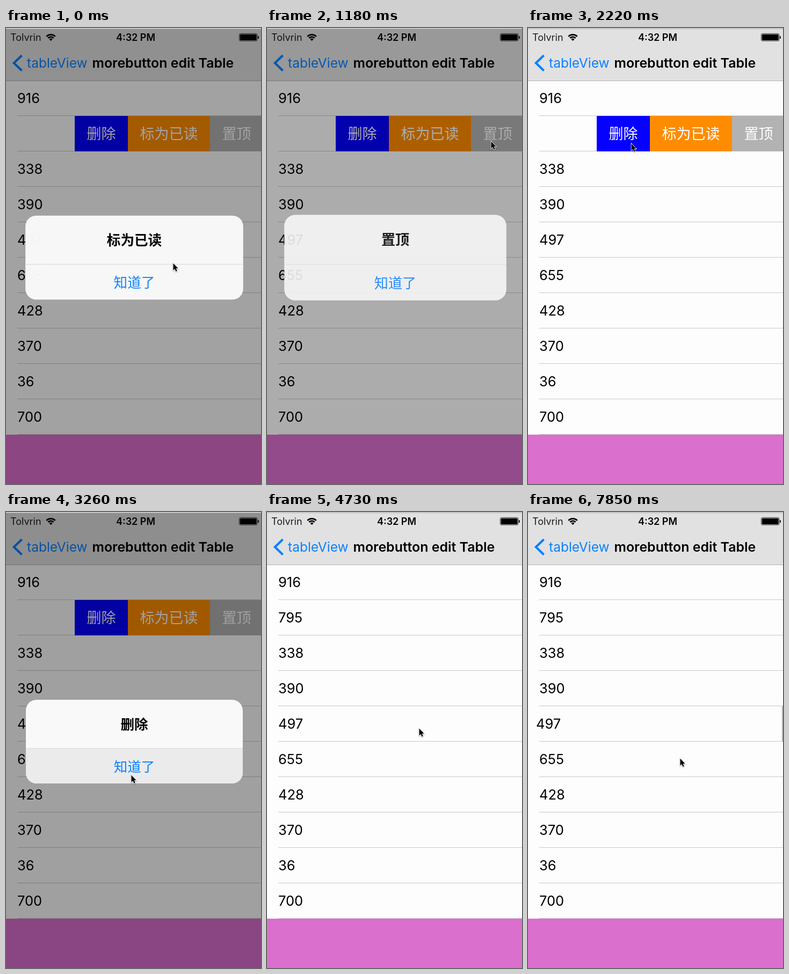
Animation, 475 px wide and 850 px high, one loop 7990 ms. Source, as an HTML page with a canvas:

```html
<!DOCTYPE html>
<html lang="zh">
<head>
<meta charset="utf-8">
<title>Table actions</title>
<style>
html, body { margin: 0; width: 100%; height: 100%; overflow: hidden; background: #fdfdfd; }
canvas { display: block; width: 475px; height: 850px; }
</style>
</head>
<body>
<canvas id="stage" width="475" height="850"></canvas>
<script>
const ctx = document.getElementById('stage').getContext('2d');
const W = 475, H = 850, LOOP = 7990, STEPS = 54;
const STEP = LOOP / STEPS;
const LATIN = 'Inter, Roboto, sans-serif';
const HAN = '"Noto Sans CJK SC", "Noto Sans CJK", sans-serif';
const BLUE = '#0b80ff';
const ROW_TOP = 98, ROW_H = 66, CELL_GAP = 4;
const LABEL = 27, PAD = 22.5;

const values = ['916', '795', '338', '390', '497', '655', '428', '370', '36', '700'];
const buttons = [
  { label: '删除', color: '#0500ff' },
  { label: '标为已读', color: '#ff8c00' },
  { label: '置顶', color: '#b2b2b2' }
];
const buttonWidth = b => b.label.length * LABEL + 2 * PAD;
const OPEN = buttons.reduce((sum, b) => sum + buttonWidth(b), 0);

const alerts = [
  { title: '标为已读', show: -274, hide: 400 },
  { title: '置顶', show: 1035, hide: 1750 },
  { title: '删除', show: 2300, hide: 3280 }
];

// Places where the pointer rests to tap
const rests = [
  { t: 0, x: 311, y: 438 },
  { t: 400, x: 258, y: 470 },
  { t: 1040, x: 417, y: 211 },
  { t: 1750, x: 256, y: 474 },
  { t: 2310, x: 192, y: 215 },
  { t: 3280, x: 233, y: 490 },
  { t: 3650, x: 213, y: 493 },
  { t: 4800, x: 283, y: 403 }
];
const ARRIVE = 100, LEAVE = 150;
const CLOSE = { start: 3700, length: 600 };
const DRAG = { start: 5474, stroke: 592 };

const mix = (a, b, p) => a + (b - a) * p;

function ease(p) {
  p = Math.min(1, Math.max(0, p));
  return p * p * (3 - 2 * p);
}

// 0 at the right end of the drag, 1 at the left end
function swing(t) {
  return (1 - Math.cos(Math.PI * (t - DRAG.start) / DRAG.stroke)) / 2;
}

function pointerAt(t) {
  if (t >= DRAG.start) {
    const turn = DRAG.start + DRAG.stroke;
    return [mix(283, 11, swing(t)), mix(403, 459, ease((t - turn) / (3 * DRAG.stroke)))];
  }
  const i = rests.findIndex(r => t < r.t - ARRIVE);
  if (i < 0) return [rests.at(-1).x, rests.at(-1).y];
  const a = rests[Math.max(0, i - 1)], b = rests[i];
  const p = ease((t - a.t - LEAVE) / (b.t - ARRIVE - a.t - LEAVE));
  return [mix(a.x, b.x, p), mix(a.y, b.y, p)];
}

function rowShift(i, t) {
  if (i === 1) return OPEN * (1 - ease((t - CLOSE.start) / CLOSE.length));
  if (i === 4 && t > DRAG.start) return mix(6, 249, swing(t));
  return 0;
}

function rect(x, y, w, h, color) {
  ctx.fillStyle = color;
  ctx.fillRect(x, y, w, h);
}

function text(str, x, y, size, color, weight = 400, family = LATIN, align = 'left') {
  ctx.font = `${weight} ${size}px ${family}`;
  ctx.textAlign = align;
  ctx.fillStyle = color;
  ctx.fillText(str, x, y);
}

function drawWifi(x, y) {
  const from = -Math.PI * 0.75, to = -Math.PI * 0.25;
  ctx.fillStyle = ctx.strokeStyle = '#000';
  ctx.lineWidth = 2.6;
  for (const r of [7.4, 11.6]) {
    ctx.beginPath();
    ctx.arc(x, y, r, from, to);
    ctx.stroke();
  }
  ctx.beginPath();
  ctx.moveTo(x, y);
  ctx.arc(x, y, 4.4, from, to);
  ctx.fill();
}

function drawBattery() {
  ctx.strokeStyle = ctx.fillStyle = '#000';
  ctx.lineWidth = 0.75;
  ctx.beginPath();
  ctx.roundRect(434.4, 10.4, 33.6, 13.8, 2.5);
  ctx.stroke();
  ctx.beginPath();
  ctx.roundRect(435.7, 11.7, 31, 11.2, 1.5);
  ctx.roundRect(469, 15, 1.8, 5, 1);
  ctx.fill();
}

function drawBar() {
  rect(0, 0, W, 98, '#e1e1e1');
  rect(0, 98, W, 1, '#b4b4b4');
  text('Tolvrin', 8, 24, 18, '#1c1c1c');
  drawWifi(83.5, 24);
  text('4:32 PM', 241.5, 24, 18, '#000', 600, LATIN, 'center');
  drawBattery();
  ctx.strokeStyle = BLUE;
  ctx.lineWidth = 4.2;
  ctx.beginPath();
  ctx.moveTo(29.5, 51);
  ctx.lineTo(14.8, 65.3);
  ctx.lineTo(29.5, 79.5);
  ctx.stroke();
  text('tableView', 39, 74, 24.5, BLUE);
  text('morebutton edit Table', 160.5, 74, 24.9, '#000', 600);
}

function drawRow(i, t) {
  const y = ROW_TOP + i * ROW_H;
  const shift = rowShift(i, t);
  text(values[i], 21 - shift, y + 42, 25.5, '#000');
  rect(21, y + ROW_H - 1, W - 21, 1, '#c8c8c8');
  const open = Math.round(shift - CELL_GAP);
  if (open <= 0) return;
  // The sliding cell uncovers fixed buttons
  ctx.save();
  ctx.beginPath();
  ctx.rect(W - open, y, open, ROW_H);
  ctx.clip();
  let x = W + CELL_GAP - OPEN;
  for (const b of buttons) {
    rect(x, y, buttonWidth(b), ROW_H, b.color);
    text(b.label, x + PAD, y + 43, LABEL, '#fff', 400, HAN);
    x += buttonWidth(b);
  }
  ctx.restore();
}

function alertAlpha(a, t) {
  if (t < a.show) return 0;
  if (t < a.hide) return 1 - Math.exp((a.show - t) / 70);
  const fade = Math.exp((a.hide - t) / 70);
  return fade < 0.01 ? 0 : fade;
}

function drawAlert(a, t) {
  const alpha = alertAlpha(a, t);
  if (!alpha) return;
  rect(0, 0, W, H, `rgba(0,0,0,${0.367 * alpha})`);
  const scale = t < a.hide ? 1 + 0.2 * (1 - alpha) : 1;
  ctx.save();
  ctx.globalAlpha = alpha;
  ctx.translate(239, 428);
  ctx.scale(scale, scale);
  ctx.beginPath();
  ctx.roundRect(-202, -78, 404, 156, 20);
  ctx.fillStyle = '#f9f9f9';
  ctx.fill();
  ctx.save();
  ctx.clip();
  if (t > a.hide - 120 && t < a.hide + 60) rect(-202, 13, 404, 65, '#ebebeb');
  rect(-202, 12, 404, 1, '#dadada');
  ctx.restore();
  text(a.title, 0, -23, 25.5, '#000', 600, HAN, 'center');
  text('知道了', 0, 55.5, 25.5, BLUE, 400, HAN, 'center');
  ctx.restore();
}

function drawPointer(x, y) {
  ctx.save();
  ctx.translate(x + 0.5, y + 0.5);
  ctx.beginPath();
  [[0, 0], [0, 13], [3, 10.4], [5.1, 15.2], [7.2, 14.3], [5.2, 9.6], [9, 9.6]]
    .forEach(p => ctx.lineTo(...p));
  ctx.closePath();
  ctx.shadowColor = 'rgba(0,0,0,.4)';
  ctx.shadowBlur = 2;
  ctx.shadowOffsetY = 1;
  ctx.strokeStyle = '#fff';
  ctx.lineWidth = 1.6;
  ctx.stroke();
  ctx.shadowColor = 'transparent';
  ctx.fillStyle = '#000';
  ctx.fill();
  ctx.restore();
}

function draw(t) {
  rect(0, 0, W, H, '#fdfdfd');
  drawBar();
  values.forEach((_, i) => drawRow(i, t));
  rect(0, 758, W, 92, '#da6fcd');
  alerts.forEach(a => drawAlert(a, t));
  rect(0, 0, W, 1, '#dcdcdc');
  rect(0, 1, W, 1, '#b0b0b0');
  drawPointer(...pointerAt(t));
}

function frame() {
  const now = performance.now() % LOOP;
  const step = Math.min(STEPS - 1, Math.floor((now + 12) / STEP));
  draw(step * STEP);
  requestAnimationFrame(frame);
}
frame();
</script>
</body>
</html>
```
